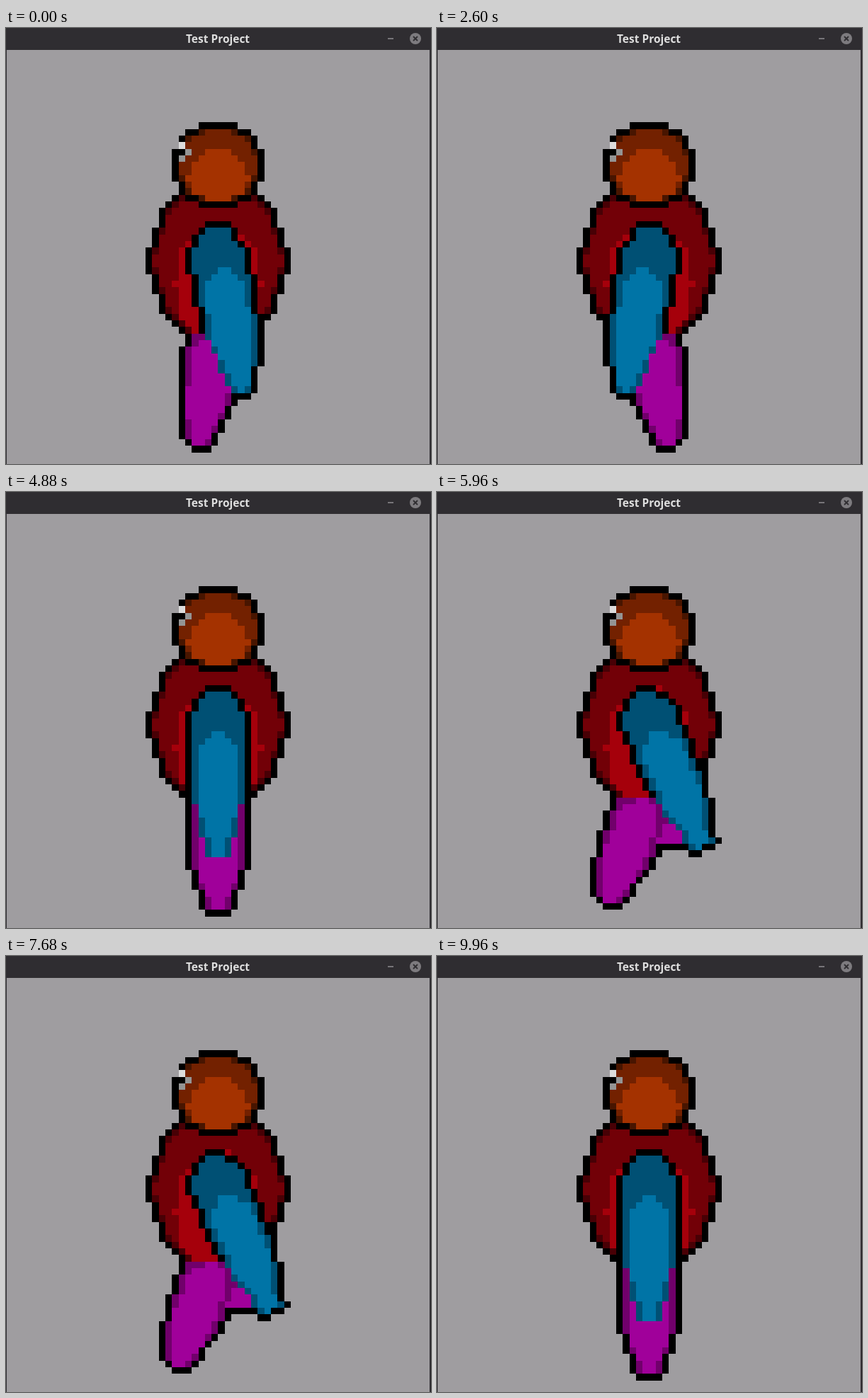
Animation, 600 px wide and 616 px high, one loop 10 s. Source, as an HTML page:

```html
<!DOCTYPE html>
<html lang="en">
<head>
<meta charset="utf-8">
<title>Walk cycle</title>
<style>
  html, body { margin: 0; width: 100%; height: 100%; overflow: hidden; background: #9f9da0; }
  svg { display: block; width: 100vw; height: 100vh; }
  text { font: bold 15.5px "Noto Sans", "Open Sans", sans-serif; fill: #dedede; text-anchor: middle; }
</style>
</head>
<body>
<svg viewBox="0 0 600 616" preserveAspectRatio="none">
  <rect width="600" height="616" fill="#2f2d31"/>
  <rect x="1" y="31" width="597" height="585" fill="#9f9da0"/>
  <text x="299" y="21.4">Test Project</text>
  <rect x="539" y="14" width="8" height="2" fill="#777579"/>
  <circle cx="578" cy="15" r="8" fill="#7d7b7f"/>
  <path d="M575 12l6 6m0-6l-6 6" stroke="#2f2d31" stroke-width="1.8"/>
  <g id="stage" transform="translate(1 30.6) scale(9.328)" shape-rendering="crispEdges"></g>
</svg>
<script>
const NS = 'http://www.w3.org/2000/svg';
const stage = document.getElementById('stage');
const SIZE = 64, MID = 32;
const BLACK = '#000', BLUE = '#005074', SKY = '#0074a6';
const PLUM = '#71006b', PINK = '#a0009a';
const RED = '#720007', BRIGHT = '#a5000b', MAROON = '#480005';
const BROWN = '#732100', ORANGE = '#a43200', UMBER = '#481500';

// Value at x on a polyline of [x, y] points; NaN beyond its ends.
function along(points, x) {
  for (let i = 1; i < points.length; i++) {
    const [x0, y0] = points[i - 1], [x1, y1] = points[i];
    if (x >= x0 && x < x1) return y0 + (y1 - y0) * (x - x0) / (x1 - x0);
  }
  return NaN;
}

// Shapes are tests on a point in grid units.
const ellipse = (cy, rx, ry) => (x, y) => ((x - MID) / rx) ** 2 + ((y - cy) / ry) ** 2 < 1;
const both = (a, b) => (x, y) => a(x, y) && b(x, y);
const above = limit => (x, y) => y < limit;

// A limb hangs from (MID, top), turned by an angle; its profile gives half widths by length.
function limb(top, profile, degrees) {
  const a = degrees * Math.PI / 180, sin = Math.sin(a), cos = Math.cos(a);
  return (x, y) => {
    const dx = x - MID, dy = y - top;
    return Math.abs(dx * cos - dy * sin) < along(profile, dx * sin + dy * cos);
  };
}

function octagon(x, y) {
  const d = Math.abs(y - MID);
  return d < 11 && Math.abs(x - MID) < Math.min(10.15 - d / 3, 15.5 - d);
}

const ARM = [[-4, 1.6], [-0.5, 3.9], [12, 3.85], [21, 1.7]];
const ARM_LIGHT = [[2, 0.5], [4.5, 3], [13, 3], [21, 0.8]];
const LEG = [[0.5, 2.5], [2.4, 4], [11, 3.8], [18, 1.5]];
const LEG_LIGHT = [[1.5, 1], [4, 3], [12, 3.1], [18, 0.8]];

function eachCell(fn) {
  for (let r = 0; r < SIZE; r++) for (let c = 0; c < SIZE; c++) fn(r, c, c + 0.5, r + 0.5);
}

// Fills a shape, outlines it except over a leg, and darkens its corners if asked.
function part(grid, shape, fill, inner, light, corner) {
  eachCell((r, c, x, y) => {
    const side = [shape(x - 1, y), shape(x + 1, y)];
    const level = [shape(x, y - 1), shape(x, y + 1)];
    if (shape(x, y)) {
      const isCorner = corner && side.includes(false) && level.includes(false);
      grid[r][c] = isCorner ? corner : inner(x, y) ? light : fill;
    } else if ([...side, ...level].includes(true) && grid[r][c] !== PLUM && grid[r][c] !== PINK) {
      grid[r][c] = BLACK;
    }
  });
}

function figure(swing) {
  const grid = Array.from({ length: SIZE }, () => Array(SIZE).fill(null));
  const step = swing * 0.92;
  const backClip = above(50);
  part(grid, both(limb(42, LEG, step), backClip), PLUM, limb(42, LEG_LIGHT, step), PINK);
  part(grid, limb(42, LEG, -step), PLUM, limb(42, LEG_LIGHT, -step), PINK);
  part(grid, octagon, RED, ellipse(35.5, 6.53, 9.3), BRIGHT, MAROON);
  part(grid, limb(31, ARM, swing), BLUE, limb(31, ARM_LIGHT, swing), SKY);
  part(grid, ellipse(17.5, 6.3, 5.8), BROWN, ellipse(19.5, 4.6, 4.6), ORANGE, UMBER);
  grid[14][26] = '#dcdcdc';
  grid[15][26] = BLACK;
  grid[15][27] = grid[16][26] = '#949494';
  return grid;
}

// One path per colour, made of horizontal runs.
function toGroup(grid) {
  const paths = {};
  grid.forEach((row, r) => {
    for (let c = 0, end; c < SIZE; c = end) {
      end = c + 1;
      while (end < SIZE && row[end] === row[c]) end++;
      if (row[c]) paths[row[c]] = (paths[row[c]] || '') + `M${c} ${r}H${end}v1H${c}z`;
    }
  });
  const g = stage.appendChild(document.createElementNS(NS, 'g'));
  for (const fill in paths) {
    const path = g.appendChild(document.createElementNS(NS, 'path'));
    path.setAttribute('fill', fill);
    path.setAttribute('d', paths[fill]);
  }
  return g;
}

const poses = [-22.5, -10, 0, 10, 22.5].map(swing => toGroup(figure(swing)));
const REST = 2;
const LOOP = 10000;

// Bursts of walking as [time, step]; the figure rests in between.
const bursts = [
  [[0, 5], [80, 6], [400, 12]],
  [[1080, 0], [1200, 2.2]],
  [[1800, 0], [3560, 34.5], [3840, 40]],
  [[3960, 0], [4880, 18.5], [5960, 44.5], [7680, 76.5], [LOOP, 119]]
];

function poseAt(t) {
  const step = bursts.map(b => along(b, t)).find(s => !isNaN(s));
  if (step === undefined) return REST;
  return 4 - Math.abs(Math.floor(step + 1e-6) % 8 - 4);
}

function draw(t) {
  const current = poseAt(t);
  poses.forEach((g, i) => g.setAttribute('display', i === current ? 'inline' : 'none'));
}

const start = performance.now();
function tick(now) {
  draw(Math.max(0, now - start) % LOOP);
  requestAnimationFrame(tick);
}
draw(0);
requestAnimationFrame(tick);
</script>
</body>
</html>
```
